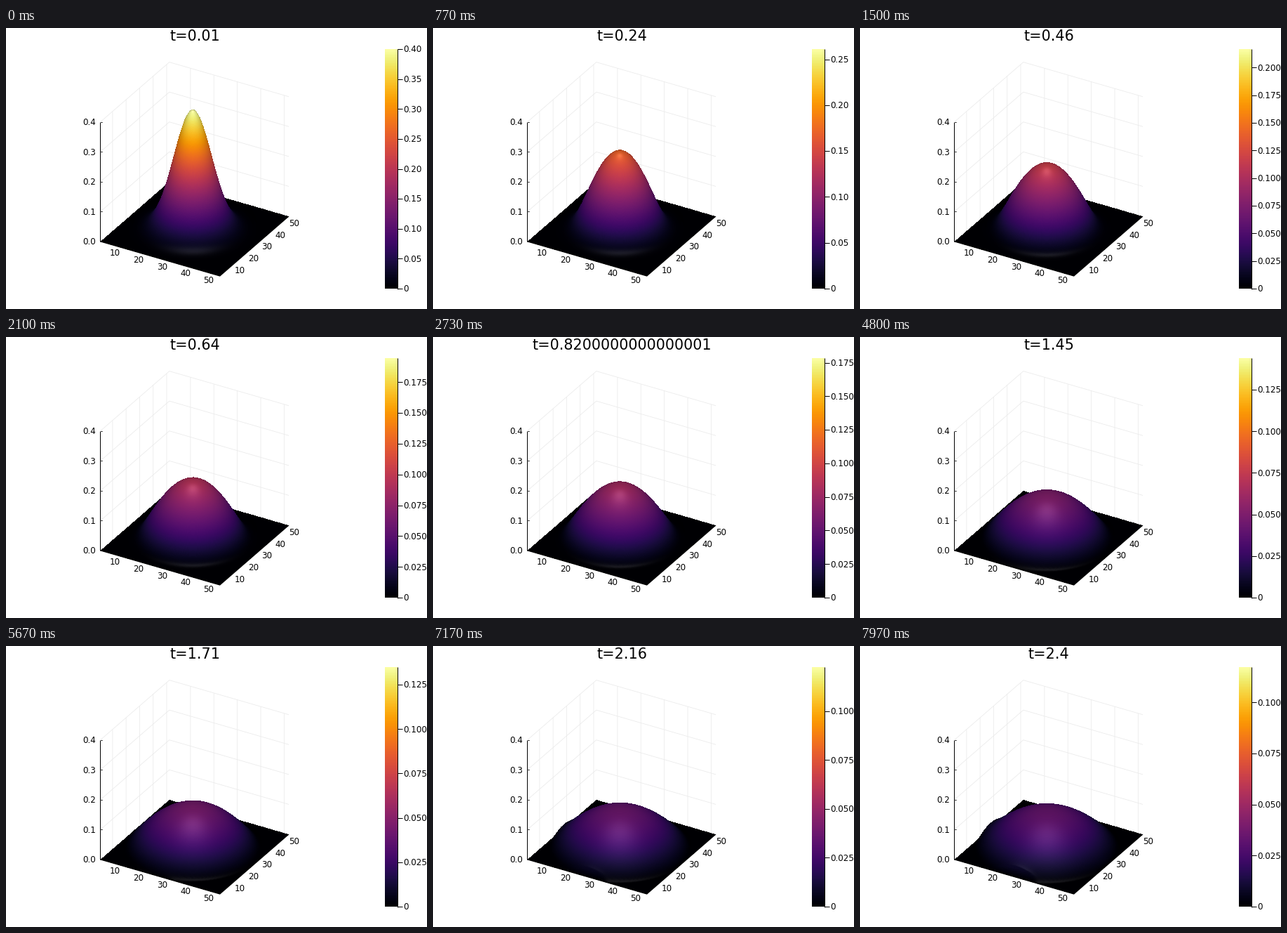
Animation, 600 px wide and 400 px high, one loop 8000 ms. Source, as a matplotlib script:

```python
import numpy as np
import matplotlib.pyplot as plt
from matplotlib.animation import FuncAnimation

W, H, DPI = 600, 400, 100
FRAMES, LOOP_MS = 240, 8000
PX = 72 / DPI                     # points per pixel
TITLE, SMALL = 20.75, 11.88       # text sizes in pixels

N, MID = 52, 25                   # grid points per side, index of the bell
SIGMA, PEAK = 7.1, 0.4            # starting bell
RATE, DT, SUB = 125.4, 0.01, 8    # nonlinear diffusion

ZMAX = 0.4
SIDE = 196.6                      # edge of the plot cube in pixels
CELL = SIDE / (N - 1)
CX, CY = 268.8, 286.0             # middle of the cube floor
SIN, COS = 0.5, np.sqrt(3) / 2    # azimuth and elevation are both 30 degrees
CMAP = plt.get_cmap("inferno")
BAR = (540, 558, 371, 30)         # left, right, bottom, top


def project(x, y, z=0.0):
    """Grid coordinates (1..N) and height to stage pixels."""
    x, y = x - (N + 1) / 2, y - (N + 1) / 2
    sx = CX + CELL * (x * COS + y * SIN)
    sy = CY + CELL * SIN * (x * SIN - y * COS) - z / ZMAX * SIDE * COS
    return sx, sy


def evolve():
    """Spreading u_t = k lap(u^2) between closed walls, inside a zero rim."""
    r = np.arange(1, N - 1) - MID
    u = PEAK * np.exp(-(r[:, None] ** 2 + r ** 2) / (2 * SIGMA ** 2))
    states = [np.pad(u, 1)]
    for _ in range(FRAMES - 1):
        for _ in range(SUB):
            v = np.pad(u * u, 1, mode="edge")
            lap = v[2:, 1:-1] + v[:-2, 1:-1] + v[1:-1, 2:] + v[1:-1, :-2]
            u = u + RATE * DT / SUB * (lap - 4 * v[1:-1, 1:-1])
        states.append(np.pad(u, 1))
    return states


STATES = evolve()

# Sight lines: one per pixel column, sampled from front to back.
X0, X1, Y0, Y1 = 134, 404, 108, 356
cols = (np.arange(X0, X1) + 0.5 - CX) / CELL
depth = np.linspace(-36.2, 36.2, 600)
gx = cols[:, None] * COS - depth * SIN + (N - 1) / 2
gy = cols[:, None] * SIN + depth * COS + (N - 1) / 2
inside = (gx >= 0) & (gx <= N - 1) & (gy >= 0) & (gy <= N - 1)
ix = np.clip(gx.astype(int), 0, N - 2)
iy = np.clip(gy.astype(int), 0, N - 2)
fx, fy = gx - ix, gy - iy
base = ix * N + iy
floor = np.where(inside, depth * CELL * SIN, -np.inf)
front = np.where(inside, floor, np.inf).min(axis=1)
levels = CY - (np.arange(Y0, Y1) + 0.5)


def sample(grid, b, tx, ty):
    g = grid.ravel()
    near = g[b] * (1 - ty) + g[b + 1] * ty
    far = g[b + N] * (1 - ty) + g[b + N + 1] * ty
    return near * (1 - tx) + far * tx


def render(u):
    """Lit surface as an RGBA image."""
    top = floor + sample(u, base, fx, fy) / ZMAX * SIDE * COS
    top = np.maximum.accumulate(top, axis=1)
    hit = np.array([np.searchsorted(t, levels) for t in top])
    c, r = np.nonzero((hit < depth.size) & (levels >= front[:, None] - 0.3))
    at = (c, hit[c, r])
    b, tx, ty = base[at], fx[at], fy[at]

    slope = SIDE / ZMAX / CELL
    dx, dy = (sample(g, b, tx, ty) * slope for g in np.gradient(u))
    up = 1 / np.sqrt(dx ** 2 + dy ** 2 + 1)
    toward = (dy * COS - dx * SIN) * up
    facing = np.clip(toward * COS + up * SIN, 0, 1)
    # highlight of a light straight above, mirrored to the viewer
    mirror = 2 * up * (toward * COS + up * SIN) - SIN
    gloss = np.clip(mirror, 0, 1) ** 10
    rgb = CMAP(sample(u, b, tx, ty) / ZMAX)[:, :3]
    rgb = rgb * (0.7 + 0.3 * facing)[:, None] + 0.1 * gloss[:, None]

    img = np.zeros((Y1 - Y0, X1 - X0, 4))
    img[r, c, :3] = np.clip(rgb, 0, 1)
    img[r, c, 3] = 1
    return img


plt.rcParams["font.family"] = "DejaVu Sans"
fig = plt.figure(figsize=(W / DPI, H / DPI), dpi=DPI, facecolor="white")
ax = fig.add_axes([0, 0, 1, 1])
ax.axis("off")


def line(points, color="black", width=1.0, z=4, **kw):
    xs, ys = zip(*points)
    return ax.plot(xs, ys, color=color, lw=width * PX, zorder=z,
                   solid_capstyle="butt", **kw)[0]


def label(x, y, s="", ha="center"):
    # y is the middle of the digits
    return ax.text(x, y + 0.365 * SMALL, s, fontsize=SMALL * PX, ha=ha,
                   va="baseline", zorder=5)


GRID = dict(color="#ebebeb", width=0.8, z=1, snap=False)
for v in range(10, 51, 10):
    line([project(1, v), project(1, v, ZMAX)], **GRID)
    line([project(v, N), project(v, N, ZMAX)], **GRID)
    x, y = project(v, 1)
    label(x - 9, y + 7.4, str(v))
    x, y = project(N, v)
    label(x + 11, y + 6.3, str(v))
for k in range(5):
    z = k / 10
    line([project(1, 1, z), project(1, N, z), project(N, N, z)], **GRID)
    x, y = project(1, 1, z)
    line([(x, y), (x + 2.5, y)])
    label(128.4, y, f"{z:.1f}", ha="right")
line([(134, project(1, 1, ZMAX)[1]), (134, project(1, 1)[1])])
line([project(1, 1), project(N, 1), project(N, N)])

left, right, bottom, top_y = BAR
ax.imshow(CMAP(np.linspace(1, 0, 256))[:, None, :], aspect="auto",
          extent=(left, right, bottom, top_y), interpolation="nearest", zorder=2)
line([(right, bottom + 0.5), (right, top_y)])
marks = [(line([(right, 0), (right + 7, 0)]), label(0, 0, ha="left"))
         for _ in range(12)]

title = ax.text(269, 18, "", fontsize=TITLE * PX, ha="center", va="baseline")
surface = ax.imshow(np.zeros((Y1 - Y0, X1 - X0, 4)), extent=(X0, X1, Y1, Y0),
                    interpolation="nearest", aspect="auto", zorder=3)
ax.set_xlim(0, W)
ax.set_ylim(H, 0)


def update(i):
    u = STATES[i]
    peak = u.max()
    title.set_text(f"t={(i + 1) * 0.01}")
    surface.set_data(render(u))
    step, digits = (0.05, 2) if peak > 0.25 else (0.025, 3)
    for k, (tick, text) in enumerate(marks):
        shown = k * step <= peak + 1e-9
        tick.set_visible(shown)
        text.set_visible(shown)
        y = bottom - (bottom - top_y) * k * step / peak
        tick.set_ydata([y, y])
        text.set_position((right + 8.3, y + 0.365 * SMALL))
        text.set_text(f"{k * step:.{digits}f}" if k else "0")
    return [title, surface]


anim = FuncAnimation(fig, update, frames=FRAMES, interval=LOOP_MS / FRAMES,
                     repeat=True, repeat_delay=0, blit=False)
plt.show()
```
